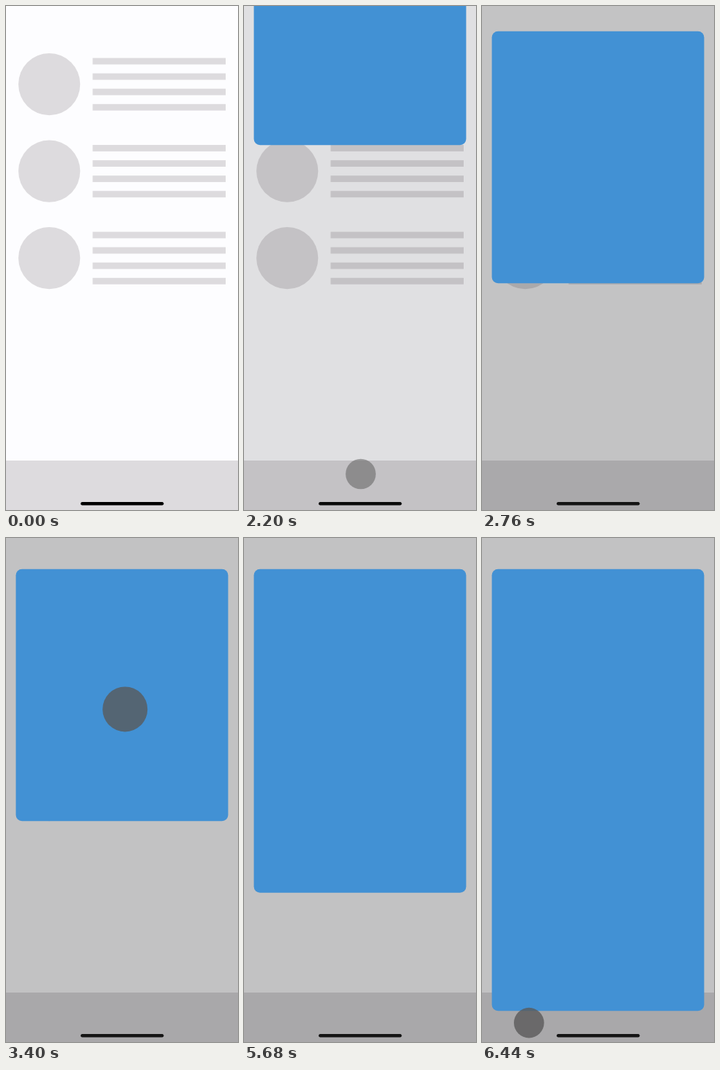
An HTML page for the animation above (8000 ms loop, 320 px wide and 693 px high).

```html
<!DOCTYPE html>
<html lang="en">
<head>
<meta charset="utf-8">
<title>Expanding top sheet</title>
<style>
  html, body { margin: 0; width: 100%; height: 100%; overflow: hidden; background: #fdfdff; }
  svg { display: block; width: 100%; height: 100%; }
  .grey { fill: #dddbde; }
  .tap { fill: #595959; }
</style>
</head>
<body>
<svg viewBox="0 0 320 693">
  <rect width="320" height="693" fill="#fdfdff"/>
  <g id="rows" class="grey"></g>
  <rect class="grey" y="625" width="320" height="68"/>
  <rect id="dim" width="320" height="693"/>
  <rect id="sheet" x="13.6" width="292.8" rx="8.5" fill="#4291d4"/>
  <g id="taps" class="tap"></g>
  <rect id="home" x="103" y="682" width="114.5" height="4.4" rx="2.2"/>
</svg>
<script>
const LOOP = 8000;
const SHEET_TOP = 42.7, SMALL = 346.5, TALL = 607.5;
const REST = SHEET_TOP + SMALL;
const $ = id => document.getElementById(id);
const clamp = v => Math.min(1, Math.max(0, v));

function add(parent, tag, attrs) {
  const el = document.createElementNS('http://www.w3.org/2000/svg', tag);
  for (const name in attrs) el.setAttribute(name, attrs[name]);
  return parent.appendChild(el);
}

for (let row = 0; row < 3; row++) {
  const y = 65 + row * 119.5;
  add($('rows'), 'circle', { cx: 59.7, cy: y + 42.6, r: 42.6 });
  for (let line = 0; line < 4; line++)
    add($('rows'), 'rect', { x: 119.5, y: y + 6.5 + line * 21.1, width: 183.5, height: 8.9 });
}

const taps = [
  { cx: 161, cy: 643.5, r: 20.8, start: 760, release: 2080, fade: 340 },
  { cx: 164.2, cy: 235.4, r: 31, start: 3400, release: 5280, fade: 340 },
  { cx: 64.8, cy: 666.6, r: 20.8, start: 6440, release: LOOP, fade: 1 }
].map(({ cx, cy, r, ...times }) => ({ ...times, el: add($('taps'), 'circle', { cx, cy, r }) }));

// Critically damped spring
function drop(t) {
  if (t < 1840) return 0;
  if (t < 2080) return 0.075;
  if (t >= 3240) return 1;
  const x = 7.4 * (t - 1977) / 1000;
  return 1 - (1 + x) * Math.exp(-x);
}

// Ease-in-out with a longer tail, solved by bisection
function ease(x) {
  let lo = 0, hi = 1, s = 0.5;
  for (let i = 0; i < 24; i++) {
    s = (lo + hi) / 2;
    const u = 1 - s;
    if (3 * u * u * s * 0.555 + 3 * u * s * s * 0.3 + s ** 3 < x) lo = s;
    else hi = s;
  }
  return s * s * (3 - 2 * s);
}

function grow(t) {
  if (t < 5080) return 0;
  if (t < 5280) return 0.0077;
  return ease(clamp((t - 5200) / 1200));
}

function draw(t) {
  const shown = drop(t);
  $('sheet').setAttribute('y', REST * shown - SMALL);
  $('sheet').setAttribute('height', SMALL + (TALL - SMALL) * grow(t));
  $('dim').setAttribute('opacity', 0.235 * shown);
  const tone = Math.round(20 * shown);
  $('home').setAttribute('fill', `rgb(${tone},${tone},${tone})`);
  for (const tap of taps) {
    const level = t < tap.start ? 0 : 1 - clamp((t - tap.release) / tap.fade);
    tap.el.setAttribute('opacity', 0.79 * level);
  }
}

const begin = performance.now();
function tick() {
  const t = (performance.now() - begin) % LOOP;
  draw(Math.floor(t / 40) * 40);
  requestAnimationFrame(tick);
}
draw(0);
requestAnimationFrame(tick);
</script>
</body>
</html>
```
